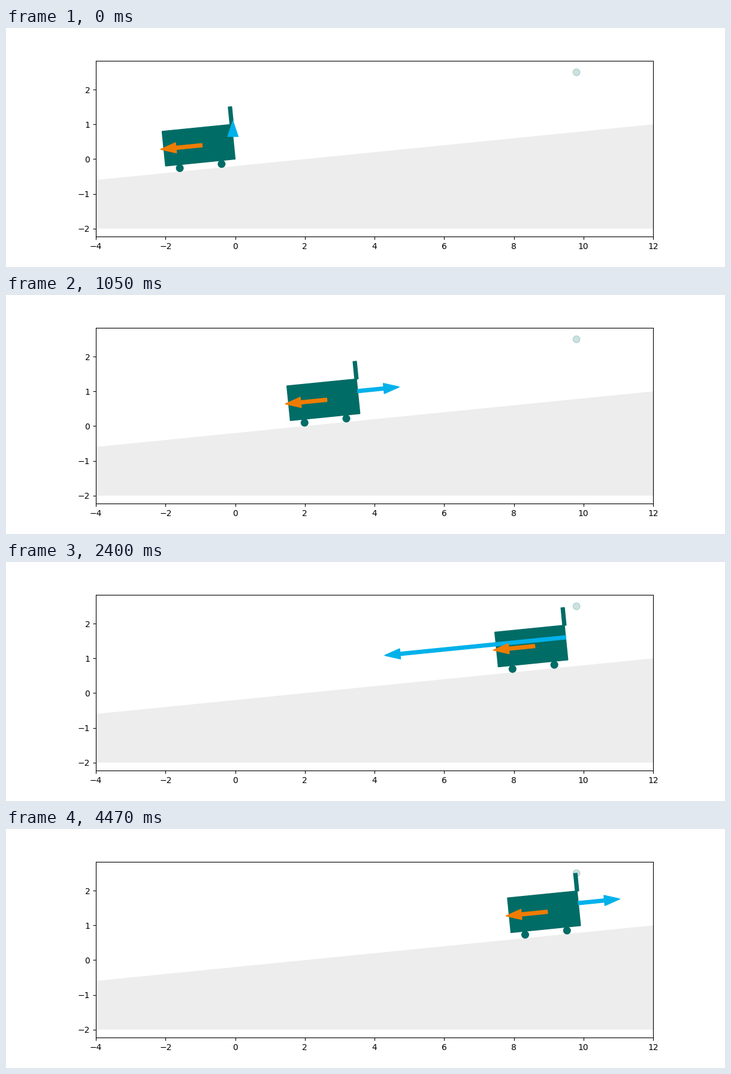
Recreate the animation shown at these times as a matplotlib script. Size 1200 by 400 pixels, loop 4.5 s.

```python
import matplotlib.pyplot as plt
import numpy as np
from matplotlib.animation import FuncAnimation
from matplotlib.patches import Circle, FancyArrow, Polygon

FRAMES, INTERVAL = 150, 30
TEAL, ORANGE, BLUE, GROUND = "#006c66", "#ef7c00", "#00b1ea", "#ededed"
SLOPE = 0.1
STEP_ACCEL = 0.007675   # position units per frame squared at full thrust
FULL_THRUST = 5.5       # arrow length at full thrust
GRAVITY = 0.748         # arrow length of the downhill force


def thrust(k):
    """Net thrust during the step ending at frame k, as a share of the limit."""
    if 1 <= k <= 17:
        return 1.0
    if 18 <= k < 40:
        return 0.45 * 0.55 ** (k - 18)
    if 73 <= k <= 90:
        return -1.0
    return -0.045 if k == 91 else 0.0


net = np.array([thrust(k) for k in range(FRAMES)])
accel = STEP_ACCEL * net
speed = np.cumsum(accel)
position = np.cumsum(speed - accel / 2)
drive = FULL_THRUST * net + GRAVITY
drive[0] = 0

# Shapes relative to the lower right corner of the cart
BODY = np.array([(-2, -0.2), (0, 0), (-0.1, 1), (-2.1, 0.8)])
HANDLE = np.array([(-0.15, 0.99), (-0.05, 1), (-0.1, 1.51), (-0.2, 1.5)])
WHEELS = np.array([(-1.59, -0.26), (-0.39, -0.14)])
DRIVE_TAIL = np.array([-0.065, 0.65])
GRAVITY_TAIL = np.array([-0.95, 0.4])

fig, ax = plt.subplots(figsize=(12, 4), dpi=100)
ax.set_aspect("equal")
ax.set_xlim(-4, 12)
ax.set_ylim(-2.23, 2.83)

ax.add_patch(Polygon([(-4, -2), (12, -2), (12, 1), (-4, -0.6)], color=GROUND, lw=0))
ax.add_patch(Circle((9.8, 2.5), 0.1, color=TEAL, alpha=0.2))
body = ax.add_patch(Polygon(BODY, color=TEAL))
handle = ax.add_patch(Polygon(HANDLE, color=TEAL))
wheels = [ax.add_patch(Circle(c, 0.1, color=TEAL)) for c in WHEELS]


def add_arrow(color):
    return ax.add_patch(FancyArrow(0, 0, 0, 0, width=0.1, color=color))


drive_arrow = add_arrow(BLUE)
gravity_arrow = add_arrow(ORANGE)


def place_arrow(arrow, tail, length):
    arrow.set_data(x=tail[0], y=tail[1], dx=length, dy=SLOPE * length)


def update(k):
    offset = position[k] * np.array([1, SLOPE])
    body.set_xy(BODY + offset)
    handle.set_xy(HANDLE + offset)
    for wheel, center in zip(wheels, WHEELS):
        wheel.center = tuple(center + offset)
    place_arrow(drive_arrow, DRIVE_TAIL + offset, drive[k])
    place_arrow(gravity_arrow, GRAVITY_TAIL + offset, -GRAVITY)
    return [body, handle, *wheels, drive_arrow, gravity_arrow]


anim = FuncAnimation(fig, update, frames=FRAMES, interval=INTERVAL, repeat=True)
plt.show()
```
